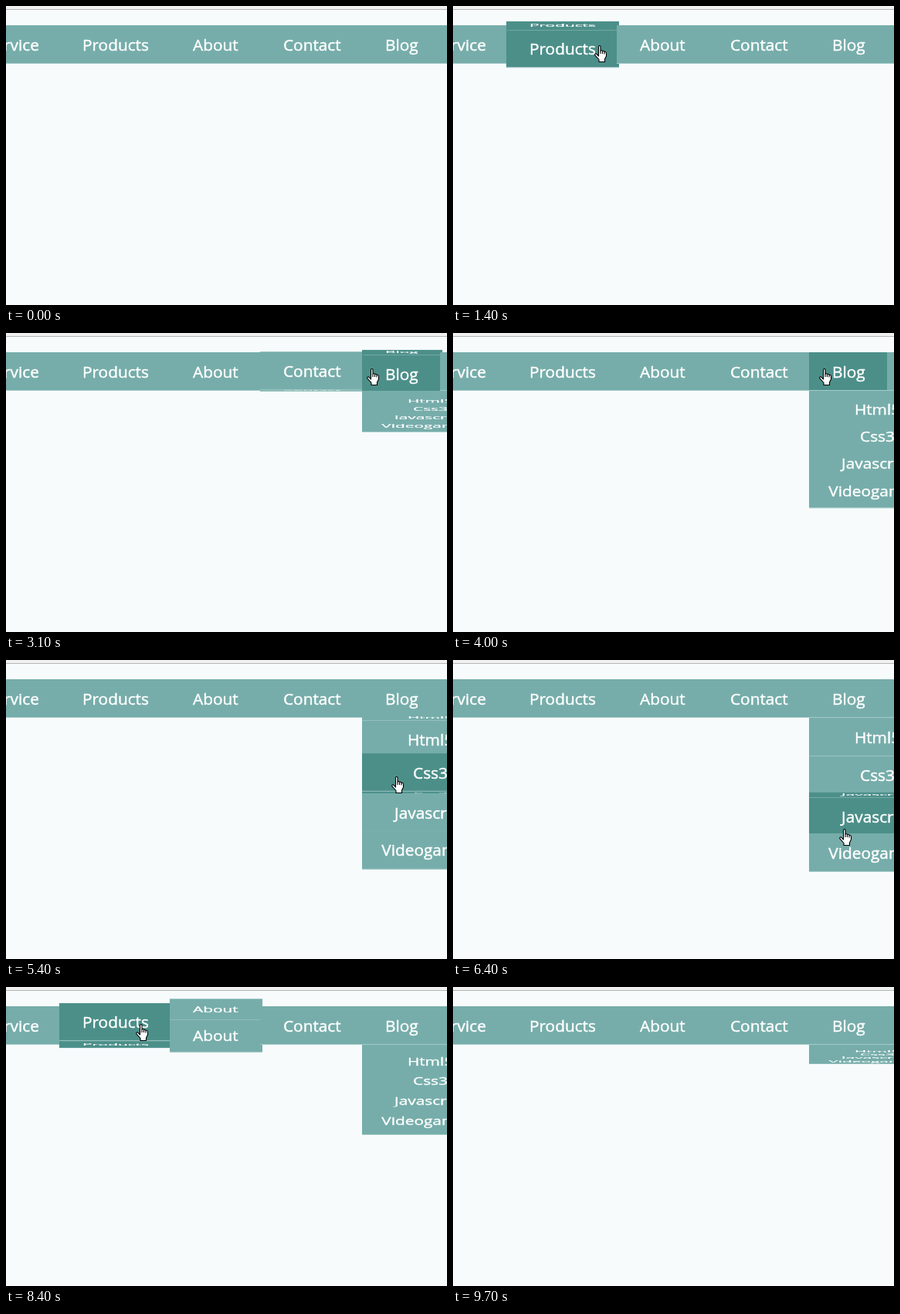
These frames come from a looping animation (571x388 px, 9800 ms). An HTML page with a canvas:

```html
<!DOCTYPE html>
<html lang="en">
<head>
<meta charset="utf-8">
<style>
  html, body { margin: 0; width: 100%; height: 100%; overflow: hidden; background: #f7fbfc; }
  canvas { display: block; }
</style>
</head>
<body>
<canvas id="stage" width="571" height="388"></canvas>
<script>
const stage = document.getElementById('stage');
const ctx = stage.getContext('2d');
const LOOP = 9800, STEP = 100;
const TURN = 1000, UNFOLD = 3570, MENU_DELAY = 65;
const FACE = 50, BAR_TOP = 25, MENU_TOP = BAR_TOP + FACE, OVERLAP = 3;
const PADDING = 30, MENU_WIDTH = 177;
const COLOR = { page: '#f7fbfc', item: '#76adaa', hover: '#4c8f89', line: '#a3cac8', text: '#ffffff' };

const makeItem = (label, x) => ({ label, x, switches: [] });
const bar = [
  makeItem('Service', -56), makeItem('Products', 69), makeItem('About', 212),
  makeItem('Contact', 329), makeItem('Blog', 461), makeItem('', 562)
];
const blog = bar[4];
const menu = ['Html5', 'Css3', 'Javascript', 'Videogaming'].map(label => makeItem(label, blog.x));
const menuSwitches = [];

// Stops of the pointer tip: time, x, y. Everything else follows from this route.
const route = [
  [200, 536, 107], [300, 474, 152], [400, 299, 203], [500, 212, 206], [800, 112, 103],
  [870, 113, 58], [1450, 195, 50], [1600, 220, 16], [1750, 270, 34], [2300, 440, 44],
  [2500, 468, 46], [4000, 479, 46], [4400, 484, 75], [5260, 501, 110], [5400, 504, 151],
  [6500, 505, 226], [6900, 504, 262], [7180, 472, 50], [7300, 465, 36], [7400, 440, 40],
  [7720, 345, 20], [8300, 209, 48], [8400, 173, 48], [8690, 170, 68], [8800, 208, 107],
  [8900, 331, 171], [9100, 506, 178]
];

function pointerAt(t) {
  const next = route.findIndex(stop => stop[0] >= t);
  if (next < 0 || t < route[0][0]) return null;
  const [t1, x1, y1] = route[next], [t0, x0, y0] = route[Math.max(0, next - 1)];
  const p = t1 > t0 ? (t - t0) / (t1 - t0) : 1;
  return { x: x0 + (x1 - x0) * p, y: y0 + (y1 - y0) * p };
}

function itemUnder(point, menuShown) {
  if (!point || point.y < BAR_TOP) return null;
  if (point.y < MENU_TOP) return bar.findLast(item => item.x <= point.x);
  if (!menuShown || point.x < blog.x) return null;
  return menu[Math.floor((point.y - MENU_TOP) / FACE)] ?? null;
}

// Walk the route once and note when each item is entered and left.
function recordHovers() {
  let current = null, menuShown = false;
  for (let t = 0; t < LOOP; t += 2) {
    const item = itemUnder(pointerAt(t), menuShown);
    if (item === current) continue;
    current?.switches.push(t);
    item?.switches.push(t);
    current = item;
    const shown = item === blog || menu.includes(item);
    if (shown !== menuShown) menuSwitches.push(t + MENU_DELAY);
    menuShown = shown;
  }
}

const bezier = (a, b, s) => 3 * a * s * (1 - s) ** 2 + 3 * b * s * s * (1 - s) + s ** 3;

function ease(p) {
  if (p <= 0) return 0;
  if (p >= 1) return 1;
  let lo = 0, hi = 1;
  for (let i = 0; i < 24; i++) {
    const mid = (lo + hi) / 2;
    if (bezier(.25, .25, mid) < p) lo = mid; else hi = mid;
  }
  return bezier(.1, 1, lo);
}

// Value from 0 to 1 of a reversible transition that is switched at the given times.
function transition(times, duration, t) {
  let from = 0, to = 0, start = 0;
  const at = when => {
    const span = duration * Math.abs(to - from);
    return span ? from + (to - from) * ease((when - start) / span) : to;
  };
  for (const time of times) {
    if (time > t) break;
    from = at(time);
    to = to ? 0 : 1;
    start = time;
  }
  return at(t);
}

const isHovered = (item, t) => item.switches.filter(time => time <= t).length % 2 === 1;

function drawFace(item, y, w, h, fill) {
  if (h < .3) return;
  const inMenu = menu.includes(item);
  ctx.save();
  ctx.translate(item.x, y);
  ctx.scale(1, h / FACE);
  ctx.fillStyle = fill;
  ctx.fillRect(0, 0, w, FACE);
  ctx.fillStyle = COLOR.line;
  ctx.fillRect(0, FACE - 1, w, 1);
  ctx.fillStyle = ctx.strokeStyle = COLOR.text;
  ctx.lineWidth = .45;
  ctx.textAlign = inMenu ? 'center' : 'left';
  const textX = inMenu ? w / 2 : PADDING;
  ctx.fillText(item.label, textX, 32.7);
  ctx.strokeText(item.label, textX, 32.7);
  ctx.restore();
}

// Front and bottom face of a box turning about its horizontal axis.
function drawBox(item, w, middle, height, t) {
  const angle = transition(item.switches, TURN, t) * Math.PI / 2;
  const front = height * Math.cos(angle), under = height * Math.sin(angle);
  const top = middle - (front + under) / 2;
  const fill = isHovered(item, t) ? COLOR.hover : COLOR.item;
  drawFace(item, top, w, front, fill);
  drawFace(item, top + front, w, under, fill);
}

function drawBar(t) {
  bar.forEach((item, i) => {
    const end = bar[i + 1]?.x ?? stage.width;
    drawBox(item, end - item.x + OVERLAP, BAR_TOP + FACE / 2, FACE, t);
  });
}

// Rows spread apart while each one tilts into view.
function drawMenu(t) {
  const open = transition(menuSwitches, UNFOLD, t);
  if (open <= 0) return;
  const height = FACE * Math.sin(open * Math.PI / 2);
  const offset = 6 * (1 - open);
  ctx.fillStyle = COLOR.item;
  ctx.fillRect(blog.x, MENU_TOP, MENU_WIDTH, offset + 1);
  menu.forEach((item, i) => {
    drawBox(item, MENU_WIDTH, MENU_TOP + offset + i * FACE * open + height / 2, height, t);
  });
}

const arrow = new Path2D('M.5 .5V16L4 12.7L6.5 18.5L9 17.4L6.5 11.8H11.5Z');
const hand = new Path2D('M.5 14V2Q.5 .5 1.8 .5Q3 .5 3 2V7Q4.5 5.8 5.5 7.5Q7 6.6 8 8.4' +
  'Q10.5 7.8 10.5 10.5V14L8.5 18V21.5H1V18.5L-4.1 12.8Q-4.5 10.5 -2.5 10.8L.5 14Z');
const fingers = new Path2D('M3 7V11M5.5 7.5V11M8 8.4V11.5');

function drawPointer(t) {
  const point = pointerAt(t);
  if (!point) return;
  const pointing = [...bar, ...menu].some(item => isHovered(item, t));
  const shape = pointing ? hand : arrow;
  ctx.save();
  ctx.translate(Math.round(point.x), Math.round(point.y));
  ctx.fillStyle = '#fff';
  ctx.strokeStyle = '#000';
  ctx.lineWidth = 1.1;
  ctx.lineJoin = 'round';
  ctx.fill(shape);
  ctx.stroke(shape);
  if (pointing) ctx.stroke(fingers);
  ctx.restore();
}

function draw(t) {
  ctx.fillStyle = COLOR.page;
  ctx.fillRect(0, 0, stage.width, stage.height);
  ctx.fillStyle = '#f1f1f1';
  ctx.fillRect(0, 0, stage.width, 4);
  ctx.fillStyle = '#b6b6b6';
  ctx.fillRect(0, 4, stage.width, 1);
  ctx.font = '20.8px "Open Sans", "Noto Sans", sans-serif';
  drawBar(t);
  drawMenu(t);
  drawPointer(t);
}

// The picture advances in even steps.
function frame() {
  const t = performance.now() % LOOP;
  draw(Math.floor(t / STEP) * STEP);
  requestAnimationFrame(frame);
}

recordHovers();
frame();
</script>
</body>
</html>
```
